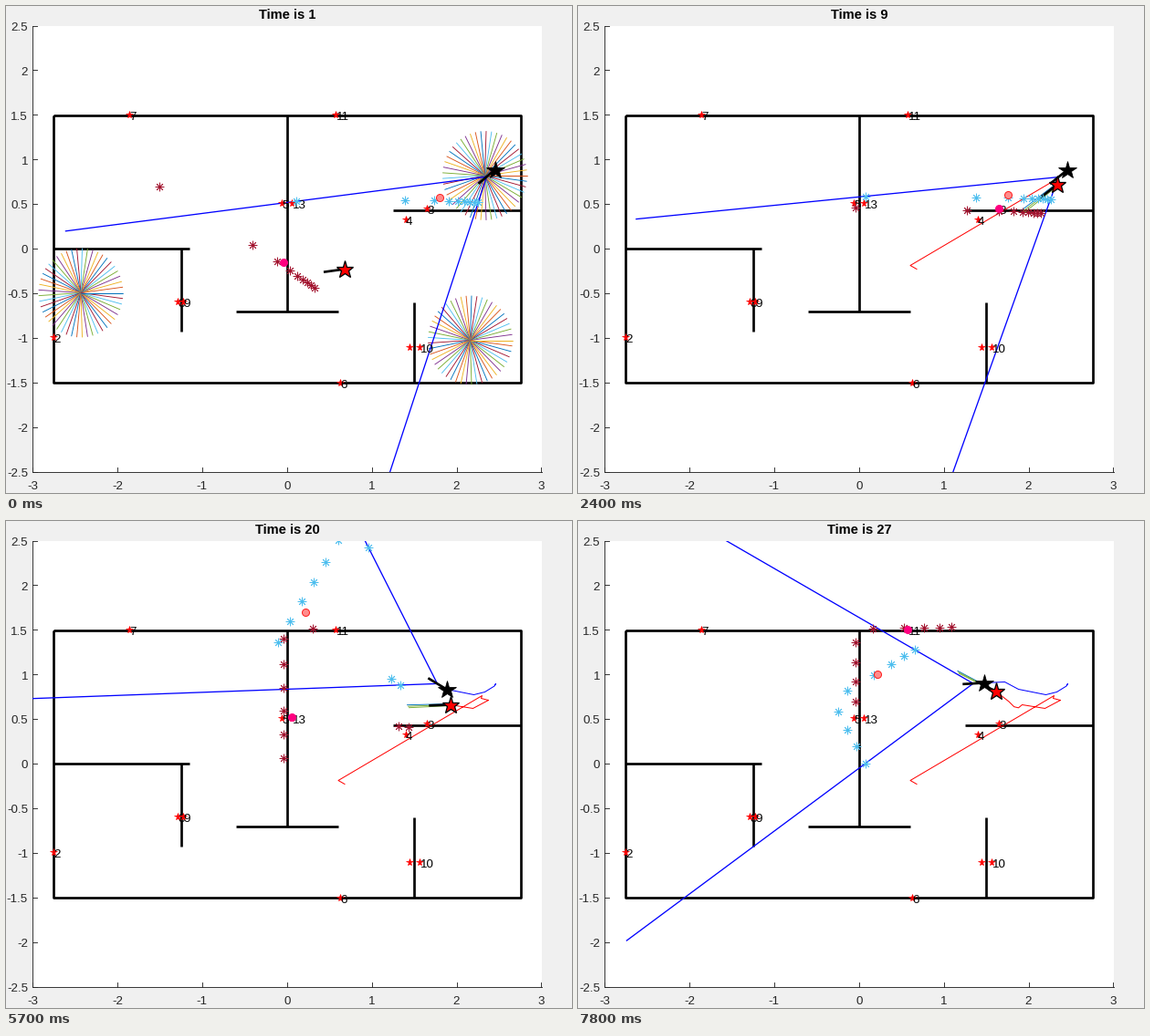
A matplotlib script that plays this animation: 620 by 534 pixels, repeating every 8000 ms.

```python
import matplotlib.pyplot as plt
import numpy as np
from matplotlib.animation import FuncAnimation
from matplotlib.collections import LineCollection
from matplotlib.patches import Rectangle

W, H, DPI = 620, 534, 64
PX = 72 / DPI                       # points per pixel
ORIGIN = np.array([308.2, 266.5])   # pixel of plot point (0, 0)
UNIT = np.array([92.9, -97.8])      # pixels per plot unit
LEFT, TOP, RIGHT, BOTTOM = 29, 22, 587, 511
INK = "#262626"
CYCLE = ["#0072BD", "#D95319", "#EDB120", "#7E2F8E", "#77AC30", "#4DBEEE", "#A2142F"]
SKY, WINE = CYCLE[5], CYCLE[6]
FOV, FOV_LEN, BEAMS = 32, 5, 9      # half angle in degrees, length, beams per scan
RANGE_BIAS = 0.04
CLUSTERS = [(82.5, 315), (525, 186.5), (509, 367)]
LOST_UNTIL = 2                      # the particles are spread out up to this time

WALLS = [
    [(52, 120), (564, 120), (564, 413), (52, 413), (52, 120)],
    [(308, 120), (308, 335)], [(252, 335), (364, 335)],
    [(52, 266.5), (201, 266.5)], [(192, 266.5), (192, 357)],
    [(424, 224), (564, 224)], [(447.5, 325), (447.5, 413)],
]
SEGMENTS = np.array([pair for wall in WALLS for pair in zip(wall, wall[1:])], float)
LANDMARKS = [
    ("8", 188, 324), ("9", 194, 324), ("2", 52.5, 363), ("3", 461, 222.5),
    ("4", 438, 234), ("5", 302, 216), ("6", 366, 413), ("7", 135, 119.5),
    ("", 442, 374.5), ("10", 453.5, 374.5), ("11", 361.5, 119.5), ("13", 313.5, 216),
]

# Way points of the robot and of its estimate: time, x, y, heading in degrees
TRUE_WAY = np.array([
    (1, 536, 180, 219), (3, 537, 179, 217.4), (12, 535.5, 181.5, 217.4), (14, 525, 188, 202),
    (16, 513, 191, 186.2), (20, 483, 185, 150), (23, 468, 177, 162.4), (27, 445, 178, 183.2)])
GUESS_WAY = np.array([
    (1, 371.5, 289, 187.5), (2, 364.5, 285, 190), (3, 522, 192, 219), (5, 521, 195, 219),
    (12, 529, 197, 215), (16, 512, 206, 201), (20, 487, 202, 182), (21.5, 481, 207, 171),
    (23, 472.5, 198.5, 160), (27, 458.5, 187.5, 154)])


def pose_at(way, t):
    x, y, heading = (np.interp(t, way[:, 0], way[:, k]) for k in (1, 2, 3))
    return np.array([x, y]), heading


def ahead(point, degrees, length):
    a = np.radians(degrees)
    return np.asarray(point) + length * UNIT * (np.cos(a), np.sin(a))


def eye_of(pose):
    return ahead(*pose, 0.125)


def cross(a, b):
    return a[..., 0] * b[..., 1] - a[..., 1] * b[..., 0]


def cast(eye, degrees):
    """Distance from the eye to the first wall."""
    ray = ahead((0, 0), degrees, 1)
    start, side = SEGMENTS[:, 0] - eye, SEGMENTS[:, 1] - SEGMENTS[:, 0]
    det = cross(ray, side)
    det = np.where(np.abs(det) < 1e-9, np.nan, det)
    dist, along = cross(start, side) / det, cross(start, ray) / det
    hit = (dist > 0) & (along >= 0) & (along <= 1)
    return dist[hit].min(initial=9)


def sense(t):
    """Wall hits and visible landmarks as (relative bearing, range)."""
    pose = pose_at(GUESS_WAY, max(t, LOST_UNTIL + 1))
    eye, heading = eye_of(pose), pose[1]
    hits = [(b, cast(eye, heading + b) + RANGE_BIAS) for b in np.linspace(-FOV, FOV, BEAMS)]
    marks_seen = []
    for _, x, y in LANDMARKS:
        dx, dy = ((x, y) - eye) / UNIT
        angle, dist = np.degrees(np.arctan2(dy, dx)) % 360, np.hypot(dx, dy)
        if abs(angle - heading) < FOV and cast(eye, angle) > dist - 0.05:
            marks_seen.append((angle - heading, dist))
    return hits, marks_seen


def project(pose, readings):
    return [ahead(eye_of(pose), pose[1] + b, r) for b, r in readings]


def particles(t):
    """Particles spread over three places at first, then one tight bundle."""
    if t <= LOST_UNTIL:
        segs = [(c, ahead(c, a, 0.5)) for c in CLUSTERS for a in np.linspace(0, 360, 50)]
        return segs, [CYCLE[i % 7] for i in range(len(segs))]
    point, heading = pose_at(GUESS_WAY, t)
    segs = [(point + k, ahead(point + k, heading + 0.6 * k, 0.5)) for k in (-1, 1, 0)]
    return segs, [CYCLE[0], CYCLE[4], CYCLE[4]]


fig = plt.figure(figsize=(W / DPI, H / DPI), dpi=DPI, facecolor="#F0F0F0")
ax = fig.add_axes([0, 0, 1, 1])
ax.set(xlim=(0.5, W + 0.5), ylim=(H + 0.5, 0.5))
ax.axis("off")
frame = Rectangle((LEFT, TOP), RIGHT - LEFT, BOTTOM - TOP, fc="white", ec="none", zorder=0)
ax.add_patch(frame)


def label(x, y, text, size=13.33, **kw):
    return ax.text(x, y, text, fontsize=size * PX, family="Liberation Sans",
                   va="baseline", **kw)


def line(points=((0, 0),), color="black", width=1.0, z=2, **kw):
    xs, ys = zip(*points)
    artist, = ax.plot(xs, ys, color=color, lw=width * PX, zorder=z, **kw)
    return artist


def marks(shape, size, face, edge, width, z):
    artist, = ax.plot([], [], ls="none", marker=shape, ms=size * PX, mfc=face, mec=edge,
                      mew=width * PX, zorder=z)
    return artist


def put(artist, points):
    artist.set_data(*np.reshape(points, (-1, 2)).T)


line([(LEFT, TOP), (LEFT, BOTTOM), (RIGHT, BOTTOM)], INK, 0.9, z=1)
for v in range(-3, 4):
    x = ORIGIN[0] + v * UNIT[0]
    line([(x, BOTTOM), (x, BOTTOM - 5)], INK, 0.9, z=1)
    label(x, 530, f"{v}", color=INK, ha="center")
for v in np.arange(-2.5, 2.6, 0.5):
    y = ORIGIN[1] + v * UNIT[1]
    line([(LEFT, y), (LEFT + 5, y)], INK, 0.9, z=1)
    label(24.5, y + 5.3, f"{v:g}", color=INK, ha="right")
for wall in WALLS:
    line(wall, width=2.67, z=2, solid_capstyle="butt")
landmark_stars = marks("*", 8.2, "red", "red", 0.7, 6)
put(landmark_stars, [p[1:] for p in LANDMARKS])
for name, x, y in LANDMARKS:
    label(x + 0.5, y + 6.3, name, color="black", zorder=5 if name == "8" else 7)

title = label(308.5, 15, "", 14.67, weight="bold", color="black", ha="center")
bundle = LineCollection([], linewidths=0.9 * PX, zorder=3)
ax.add_collection(bundle)
view = line(color="blue", width=1.3, z=4)


def robot(path_color, star, hits, corners):
    """Artists of one robot: path, nose, star, wall hits and landmarks."""
    return (line(color=path_color, z=4),
            line(width=2.67, z=8, solid_capstyle="butt"),
            marks("*", *star, 9),
            marks((8, 2, 0), 9.5, "none", hits, 0.9, 10),
            marks("o", 8, *corners, 1, 11))


ROBOTS = [
    (TRUE_WAY, robot("blue", (20.5, "black", "black", 0.8), SKY, ("#FF8C8C", "#FF2020"))),
    (GUESS_WAY, robot("red", (19.5, "red", "black", 1.3), WINE, ("#FF0080", "#FF0080"))),
]
view.set_clip_path(frame)
for _, artists in ROBOTS:
    artists[3].set_clip_path(frame)


def update(i):
    t = 1 + i // 3
    title.set_text(f"Time is {t}")
    hits, corners = sense(t)
    for way, (path, nose, star, hit_marks, corner_marks) in ROBOTS:
        pose = pose_at(way, t)
        put(path, [pose_at(way, s)[0] for s in range(1, t + 1)])
        put(nose, [pose[0], ahead(*pose, 0.25)])
        put(star, pose[0])
        put(hit_marks, project(pose, hits))
        put(corner_marks, project(pose, corners))
    pose = pose_at(TRUE_WAY, t)
    left, right = project(pose, [(-FOV, FOV_LEN), (FOV, FOV_LEN)])
    put(view, [left, eye_of(pose), right])
    segs, colors = particles(t)
    bundle.set_segments(segs)
    bundle.set_color(colors)
    return []


anim = FuncAnimation(fig, update, frames=80, interval=100, repeat=True, repeat_delay=0)
plt.show()
```
